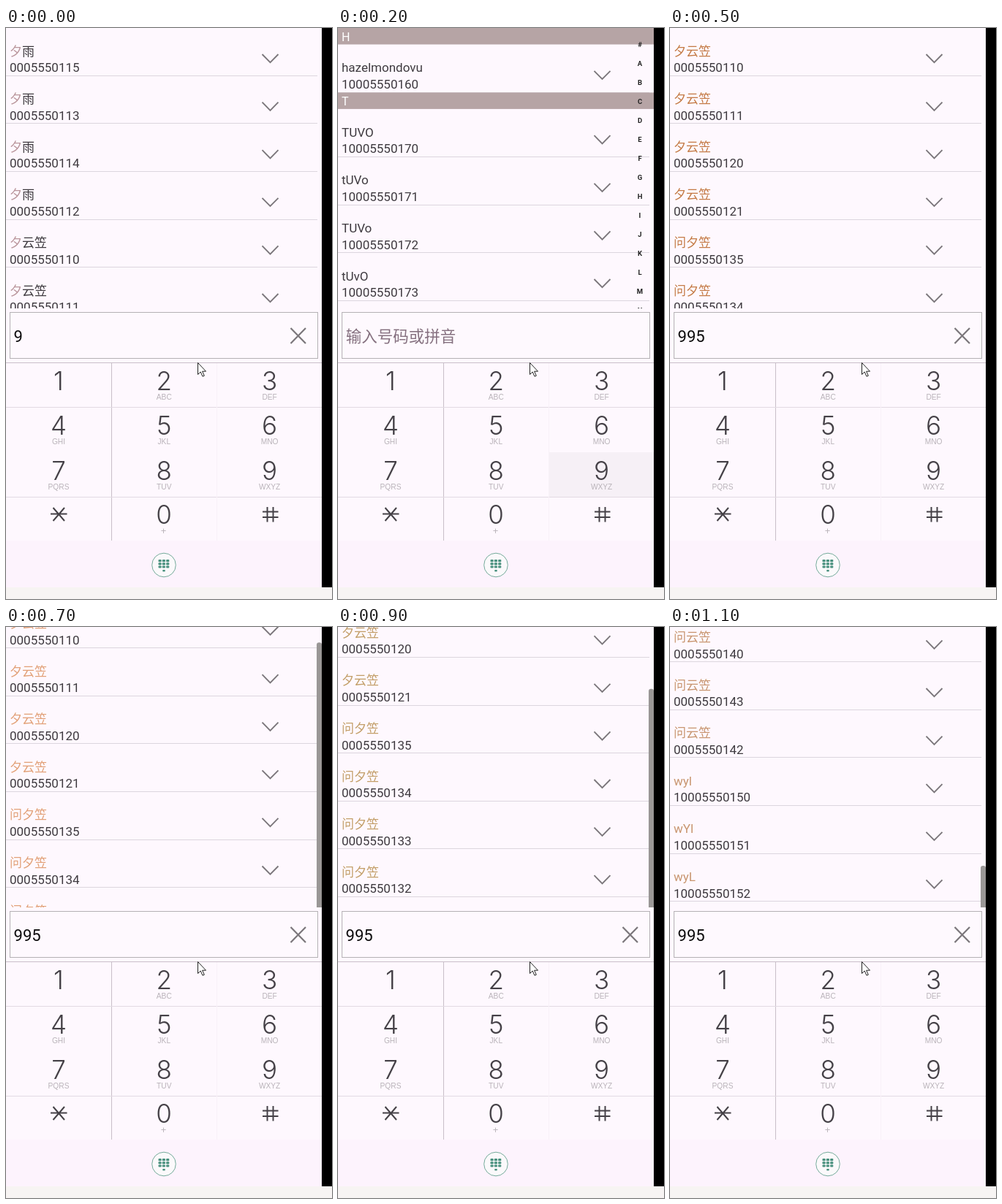
An HTML page that plays this animation: 446x782 px, repeating every 1200 ms.

```html
<!DOCTYPE html>
<html lang="zh">
<head>
<meta charset="utf-8">
<title>Dialer search</title>
<style>
  html, body { margin: 0; width: 100%; height: 100%; overflow: hidden; }
  svg { display: block; width: 446px; height: 782px; }
  text { font-family: Roboto, "Noto Sans CJK SC", "Noto Sans CJK", sans-serif; fill: #3e3a3f; }
  path { fill: none; }
  .row text { font-size: 17px; }
  .row path { stroke: #7b767b; stroke-width: 1.9; }
  .row line { stroke: #dcd6de; shape-rendering: crispEdges; }
  .head { font-size: 16px; fill: #fff; }
  .index { font-size: 9.5px; font-weight: 700; text-anchor: middle; fill: #222; }
  .query { font-size: 22px; fill: #0c0b0c; }
  .hint { font-size: 21.5px; fill: #85707f; }
  .digit { font: 300 35px Inter, sans-serif; text-anchor: middle; fill: #454147; }
  .sub { font: 10.2px "Liberation Sans", Arial, sans-serif; text-anchor: middle; fill: #b9b3b9; }
  .sign { stroke: #454147; stroke-width: 2; }
</style>
</head>
<body>
<svg viewBox="0 0 446 782">
  <defs><clipPath id="view"><rect width="432" height="384"/></clipPath></defs>
  <rect width="446" height="782" fill="#fef8fe"/>
  <g id="list" clip-path="url(#view)"></g>
  <rect x="5.5" y="389.5" width="421" height="63" fill="#fef9fe" stroke="#b5b1b5"/>
  <g id="field"></g>
  <rect id="press" width="144" height="61" fill="#f6f0f6"/>
  <path d="M0 458.5H432M144.5 458V702" stroke="#c9bfc9"/>
  <path d="M0 519.5H432M0 642.5H432" stroke="#e2dae3"/>
  <path d="M288.5 459V702" stroke="#f8f1f8"/>
  <g id="keys"></g>
  <path class="sign" d="M61 665.500H83.500M64.500 657L80 675M80 657L64.500 675"/>
  <path class="sign" d="M357.500 656V676.500M365.500 656V676.500M351 662.500H372.500M351 670H372.500"/>
  <rect y="702" width="432" height="64" fill="#fdf3fd"/>
  <circle cx="216" cy="735.5" r="16.3" fill="#fbf9fb" stroke="#74aa9a"/>
  <g id="dots" fill="#4a917f"></g>
  <rect y="766" width="446" height="16" fill="#f7f4f3"/>
  <rect x="432" width="14" height="766"/>
  <path d="M262.500 458.500V474.500L266.200 471L269 477.200L271.300 476.200L268.600 470.200H273.500Z" style="fill:#fff" stroke="#222"/>
</svg>
<script>
const $ = id => document.getElementById(id);
const PITCH = 65.6;

const phone = n => '00055501' + (10 + n);
const entry = (name, n) => ({ name, tel: phone(n) });
const longEntry = (name, n) => ({ name, tel: '1' + phone(n) });
const group = (name, ids) => ids.map(n => entry(name, n));

const cloud = group('夕云笠', [0, 1, 10, 11]);
const found = [...group('夕雨', [5, 3, 4, 2]), ...cloud.slice(0, 2)];
const narrowed = [
  ...cloud,
  ...group('问夕笠', [25, 24, 23, 22]),
  ...group('问云笠', [31, 30, 33, 32]),
  ...['wyl', 'wYl', 'wyL'].map((name, i) => longEntry(name, 40 + i))
];
const all = [
  { head: 'H' }, longEntry('hazelmondovu', 50),
  { head: 'T' }, ...['TUVO', 'tUVo', 'TUVo', 'tUvO'].map((name, i) => longEntry(name, 60 + i))
];

// One state per 100 ms
const idle = { rows: all, query: '' };
const two = { rows: found, query: '99', hits: 2, tint: '#dd8b7c' };
const three = (tint, off) => ({ rows: narrowed, query: '995', hits: 3, tint, off });
const states = [
  { rows: found, query: '9', hits: 1, tint: '#b9959b' },
  idle,
  { ...idle, press: [2, 2] },
  two,
  { ...two, press: [1, 1] },
  three('#c47a45', 0),
  three('#c47a45', 0),
  three('#e2a077', 36.5),
  three('#e2a077', 92),
  three('#c39e68', 155),
  three('#c39e68', 380),
  three('#c8956f', 608)
];

function row({ name, tel }, y, hits, tint) {
  return `<g class="row" transform="translate(0 ${y})">
    <text x="5" y="37.5"><tspan style="fill:${tint}">${name.slice(0, hits)}</tspan>${name.slice(hits)}</text>
    <text x="5" y="60.2">${tel}</text>
    <path d="M350.5 36L361.500 47.200L372.500 36"/>
    <line x2="426" y1="65.2" y2="65.2"/></g>`;
}

function header(letter, y) {
  return `<rect y="${y}" width="432" height="22.5" fill="#b6a4a5"/>
    <text class="head" x="5" y="${y + 17.5}">${letter}</text>`;
}

function letterIndex() {
  return [...'#ABCDEFGHIJKLMN'].map((c, i) =>
    `<text class="index" x="413" y="${26 + 26 * i}">${c}</text>`).join('');
}

function list({ rows, hits = 0, tint = '', off = 0 }) {
  let y = -off, out = '';
  for (const item of rows) {
    out += item.head ? header(item.head, y) : row(item, y, hits, tint);
    y += item.head ? 22.8 : PITCH;
  }
  if (rows === all) out += letterIndex();
  if (off) out += `<rect x="425" y="${1.8 + 0.535 * off}" width="7" height="400" rx="3" fill="#9a9796"/>`;
  return out;
}

function field(query) {
  return query
    ? `<text class="query" x="10.6" y="430">${query}</text>
       <path d="M389.500 411L410 432M410 411L389.500 432" stroke="#7b767b" stroke-width="2.2"/>`
    : '<text class="hint" x="10.8" y="430">输入号码或拼音</text>';
}

function show(s) {
  $('list').innerHTML = list(s);
  $('field').innerHTML = field(s.query);
  const [col, line] = s.press || [9, 9];
  $('press').setAttribute('x', col * 144);
  $('press').setAttribute('y', 458.5 + line * 61.3);
}

const labels = ['', 'ABC', 'DEF', 'GHI', 'JKL', 'MNO', 'PQRS', 'TUV', 'WXYZ'];
const key = (digit, sub, x, y) =>
  `<text class="digit" x="${x}" y="${y + 12.2}">${digit}</text>
   <text class="sub" x="${x}" y="${y + 25.2}">${sub}</text>`;
$('keys').innerHTML = labels.map((sub, i) =>
  key(i + 1, sub, 72 + 144.3 * (i % 3), 484 + 61.2 * Math.floor(i / 3))).join('')
  + key(0, '', 216, 666.5) + '<text class="sub" x="215.5" y="692.5" style="font-size:13px">+</text>';

const dot = (x, y, w, h) => `<rect x="${x}" y="${y}" width="${w}" height="${h}" rx="1"/>`;
$('dots').innerHTML = Array.from({ length: 9 }, (_, i) =>
  dot(208.5 + 5.3 * (i % 3), 728 + 4.2 * Math.floor(i / 3), 4.2, 3.2)).join('')
  + dot(214.2, 742, 3.6, 2.4);

let current = -1;
function tick() {
  const step = Math.floor(performance.now() % 1200 / 100);
  if (step !== current) show(states[current = step]);
  requestAnimationFrame(tick);
}
tick();
</script>
</body>
</html>
```
